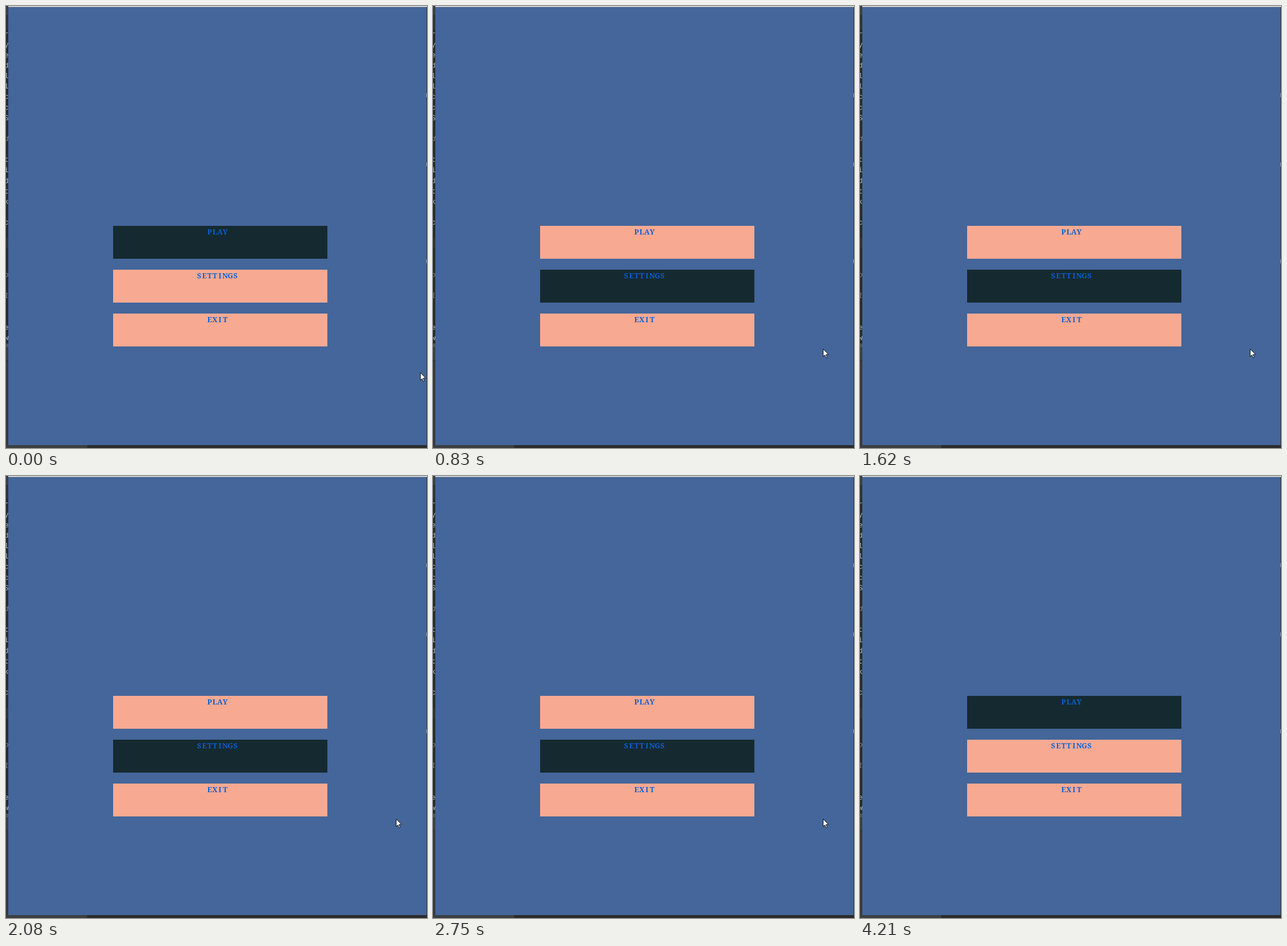
An HTML page with a canvas that plays this animation: 731 px wide and 766 px high, repeating every 4280 ms.

```html
<!DOCTYPE html>
<html lang="en">
<head>
<meta charset="utf-8">
<title>Menu</title>
<style>
  html, body { margin: 0; width: 100%; height: 100%; overflow: hidden; background: #2b2b2b; }
  canvas { display: block; }
</style>
</head>
<body>
<canvas id="stage" width="731" height="766"></canvas>
<script>
const ctx = document.getElementById('stage').getContext('2d');
const LOOP = 4280;
const BLUE = '#44669a', PEACH = '#f8a992', DARK = '#152a30', INK = '#0860d4';

const LABELS = ['PLAY', 'SETTINGS', 'EXIT'];
// [time, selected item]
const PICKS = [[0, 0], [830, 1], [1220, 2], [1620, 1], [1820, 0],
               [2080, 1], [2290, 2], [2750, 1], [2960, 0]];

// One character per editor line; capitals after the first block stay plain
const EDITOR = 'ryedllccS d tidtk c    o l  ew';
const DIM_LINES = [10, 23, 25];

function box(color, x, y, w, h) {
  ctx.fillStyle = color;
  ctx.fillRect(x, y, w, h);
}

function drawBackdrop() {
  box('#2b2b2b', 0, 0, 731, 766);
  box('#3c3f41', 0, 0, 4, 16);
  box('#323436', 0, 17, 4, 23);
  box('#323232', 0, 402, 4, 18);
  box('#505355', 0, 585, 4, 7);
  box('#3c3f41', 0, 593, 4, 21);
  box('#38393b', 0, 615, 4, 151);
  box('#3c3f41', 0, 761, 141, 5);

  ctx.textAlign = 'right';
  ctx.textBaseline = 'alphabetic';
  [...EDITOR].forEach((ch, i) => {
    const dim = DIM_LINES.includes(i);
    ctx.font = (dim ? 'italic ' : '') + '13px "Liberation Mono", monospace';
    ctx.fillStyle = dim ? '#808080' : '#a9b7c6';
    ctx.fillText(ch, 4.5, 52.5 + i * 18.15);
  });

  box(BLUE, 4, 2, 726, 759);
  box('#f2f3f5', 4, 0, 727, 1.6);
  box('#2c3440', 730, 2, 1, 759);
  for (const y of [151, 271, 439]) box('#8a929c', 730, y, 1, 7);
}

// Letters sit centred in equal cells, like a typewriter face
function drawLabel(text, baseline) {
  const cell = 9, left = 367 - text.length * cell / 2;
  ctx.font = 'bold 12.5px "Noto Serif", "Liberation Serif", serif';
  ctx.textAlign = 'center';
  ctx.fillStyle = INK;
  [...text].forEach((ch, i) => ctx.fillText(ch, left + (i + 0.5) * cell, baseline));
}

function drawMenu(selected) {
  LABELS.forEach((label, i) => {
    const y = 381 + i * 76;
    box(i === selected ? DARK : PEACH, 186, y, 372, 57);
    drawLabel(label, y + 15);
  });
}

function pointerAt(t) {
  if (t < 430) {
    const k = t < 70 ? 0 : 1 + Math.floor((t - 70) / 72);
    const p = 1 - (1 - k / 6) ** 2;
    return [719 - 42 * p, 635 - 41 * p];
  }
  if (t < 3620) return [677, 594];
  if (t >= 4010) return null;
  const p = Math.floor((t - 3620) / 65) / 5;
  return [681 + 24 * p, 613 + 142 * p];
}

function drawPointer([x, y]) {
  const shape = [[0.5, 0.5], [0.5, 13.5], [3.4, 10.8], [5.4, 15.8],
                 [7.4, 15], [5.4, 10.1], [9.6, 9.8]];
  ctx.save();
  ctx.translate(Math.round(x), Math.round(y));
  ctx.beginPath();
  shape.forEach(([px, py]) => ctx.lineTo(px, py));
  ctx.closePath();
  ctx.fillStyle = '#fff';
  ctx.fill();
  ctx.strokeStyle = '#111';
  ctx.lineWidth = 1;
  ctx.stroke();
  ctx.restore();
}

function draw(t) {
  drawBackdrop();
  drawMenu(PICKS.filter(([at]) => at <= t).pop()[1]);
  const pointer = pointerAt(t);
  if (pointer) drawPointer(pointer);
}

const start = performance.now();
function tick() {
  draw((performance.now() - start) % LOOP);
  requestAnimationFrame(tick);
}
tick();
</script>
</body>
</html>
```
